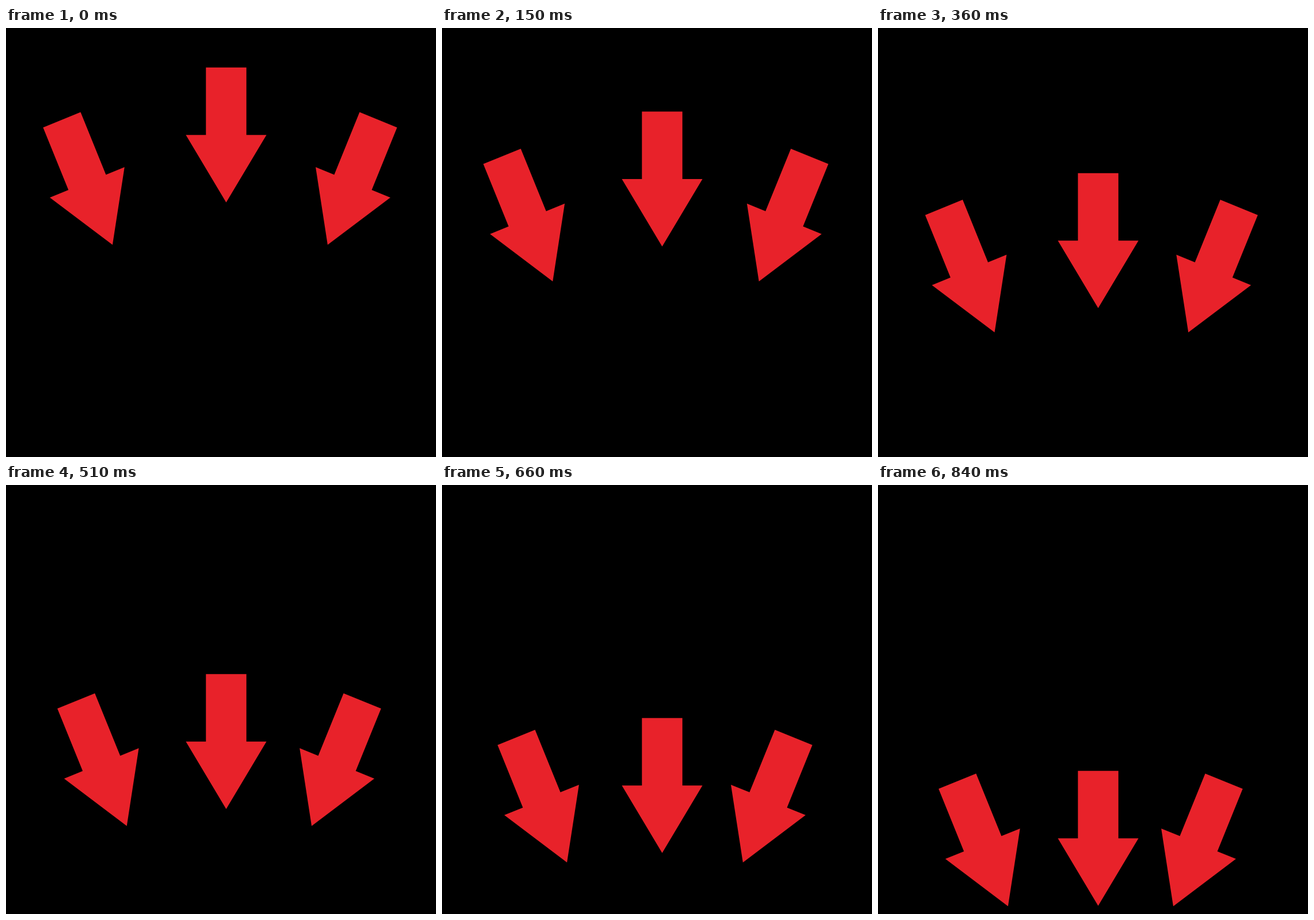
Animation, 750 px wide and 747 px high, one loop 0.87 s. Source, as an HTML page with a canvas:

```html
<!DOCTYPE html>
<html lang="en">
<head>
<meta charset="utf-8">
<title>Falling arrows</title>
<style>
html, body { margin: 0; width: 100%; height: 100%; overflow: hidden; background: #000; }
canvas { display: block; }
</style>
</head>
<body>
<canvas id="stage" width="750" height="747"></canvas>
<script>
const ctx = document.getElementById('stage').getContext('2d');
const STEP_MS = 30;
const STEPS = 29;
const TILT = 22.1 * Math.PI / 180;

// Start position of each tip and its travel per step
const arrows = [
  { x: 185.8, y: 377.6, dx: 1.464, dy: 12.71, angle: -TILT },
  { x: 384, y: 303.8, dx: 0, dy: 15.32, angle: 0 },
  { x: 561, y: 377.6, dx: -1.643, dy: 12.71, angle: TILT }
];

// Arrow pointing down, tip at the origin
const shape = new Path2D('M0 0 L70.3 -117.5 H35.3 V-235 H-35.3 V-117.5 H-70.3 Z');

function draw(now) {
  const step = Math.floor(now / STEP_MS) % STEPS;
  ctx.fillStyle = '#000';
  ctx.fillRect(0, 0, 750, 747);
  ctx.fillStyle = '#e8222a';
  for (const { x, y, dx, dy, angle } of arrows) {
    ctx.save();
    ctx.translate(x + dx * step, y + dy * step);
    ctx.rotate(angle);
    ctx.fill(shape);
    ctx.restore();
  }
}

let start;
function tick(now) {
  start ??= now;
  draw(now - start);
  requestAnimationFrame(tick);
}
draw(0);
requestAnimationFrame(tick);
</script>
</body>
</html>
```
